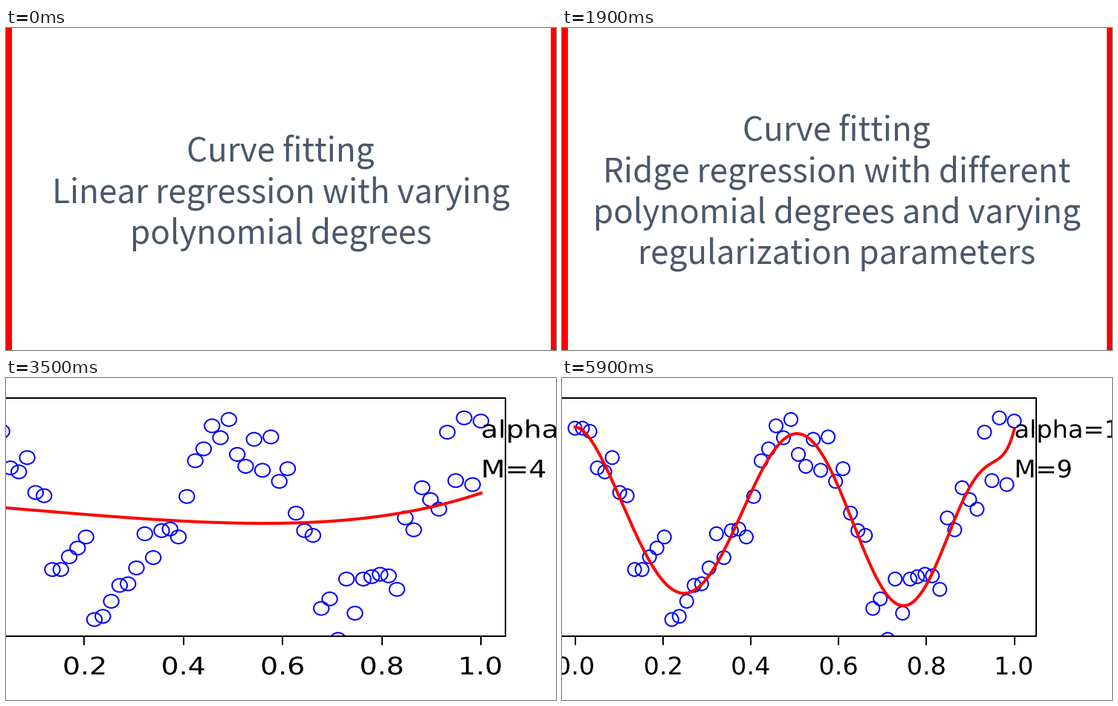
These frames come from a looping animation (740x434 px, 6200 ms). A matplotlib script:

```python
import numpy as np
import matplotlib.pyplot as plt
from matplotlib.animation import FuncAnimation
from matplotlib.collections import PatchCollection
from matplotlib.patches import Ellipse, PathPatch, Rectangle
from matplotlib.textpath import TextPath
from matplotlib.transforms import Affine2D

W, H, DPI = 740, 434, 100
STEP = 100            # ms per frame
PT = 72 / DPI         # points per pixel
SLATE = "#4a586a"
SOFT = dict(color="#2b2b2b", pen=2.7, lw=5)   # look of the enlarged charts
DEGREES = (1, 4, 6, 9)
ALPHAS = (1, 1e-4, 1e-20)

plt.rcParams["font.family"] = "DejaVu Sans"
fig = plt.figure(figsize=(W / DPI, H / DPI), dpi=DPI, facecolor="white")
ax = fig.add_axes([0, 0, 1, 1])
ax.axis("off")

# Noisy cosine samples, in hundredths
ys = np.array([
    112, 112, 108, 62, 57, 75, 31, 27, -66, -66, -50, -39, -25, -129, -125,
    -106, -86, -84, -64, -21, -51, -17, -15, -25, 26, 71, 86, 115, 100, 123,
    79, 64, 98, 59, 101, 45, 61, 5, -17, -23, -115, -103, -154, -78, -121,
    -78, -75, -72, -74, -91, -1, -16, 37, 22, 10, 107, 46, 125, 41, 121]) / 100
xs = np.linspace(0, 1, len(ys))
grid = np.linspace(0, 1, 240)


def fit(degree, alpha=0):
    """Ridge fit with a free intercept, evaluated on the grid."""
    powers = np.arange(1, degree + 1)
    X = xs[:, None] ** powers
    mean = X.mean(axis=0)
    A = np.vstack([X - mean, np.sqrt(alpha) * np.eye(degree)])
    b = np.concatenate([ys - ys.mean(), np.zeros(degree)])
    coef = np.linalg.lstsq(A, b, rcond=1e-15)[0]
    return (grid[:, None] ** powers - mean) @ coef + ys.mean()


def glyphs(s):
    return TextPath((0, 0), s.replace("-", "\u2212") if s[0] == "-" else s, size=100)


def ink(s):
    box = glyphs(s).get_extents()
    return box.x0 / 100, box.x1 / 100


class Chart:
    """Plot picture with its own horizontal and vertical scale."""

    def __init__(self, x0, u, y0, v, em, dot, xticks, yticks,
                 fmt="%.1f", yfmt="%d", color="black", pen=2.0, lw=4.0):
        self.x0, self.u, self.y0, self.v = x0, u, y0, v
        self.em, self.dot = em, dot
        self.xticks, self.yticks = xticks, yticks
        self.fmt, self.yfmt = fmt, yfmt
        self.color, self.pen, self.lw = color, pen, lw

    def px(self, x):
        return self.x0 + self.u * np.asarray(x)

    def py(self, y):
        return self.y0 - self.v * np.asarray(y)

    def text(self, s, x, y):
        ex, ey = self.em
        move = Affine2D().scale(ex / 100, -ey / 100).translate(x, y)
        patch = PathPatch(move.transform_path(glyphs(s)), fc=self.color,
                          ec=self.color, lw=(self.pen - 2) * PT, zorder=4)
        return ax.add_patch(patch)

    def line(self, xx, yy):
        return ax.plot(xx, yy, color=self.color, lw=self.pen * PT, zorder=3,
                       solid_capstyle="butt")[0]

    def ylabels(self, edge, values):
        ex, ey = self.em
        return [self.text(s, edge - (0.82 + ink(s)[1]) * ex, self.py(t) + 0.365 * ey)
                for t in values for s in [self.yfmt % t]]

    def draw(self, curve, notes):
        ex, ey = self.em
        left, right = self.px([-0.05, 1.05])
        top, bottom = self.py([1.5, -1.5])
        clip = Rectangle((left, top), right - left, bottom - top, transform=ax.transData)

        dots = PatchCollection(
            [Ellipse(p, *self.dot) for p in zip(self.px(xs), self.py(ys))],
            facecolor="none", edgecolor="#0000ff", linewidth=self.pen * PT, zorder=1)
        ax.add_collection(dots, autolim=False)
        red = ax.plot(self.px(grid), self.py(curve), color="#ff0000",
                      lw=self.lw * PT, zorder=2)[0]
        for artist in (dots, red):
            artist.set_clip_path(clip)

        parts = [dots, red,
                 self.line([left, right, right, left, left],
                           [top, top, bottom, bottom, top])]
        for t in self.xticks:
            s, x = self.fmt % t, self.px(t)
            parts.append(self.line([x, x], [bottom, bottom + 0.36 * ey]))
            parts.append(self.text(s, x - sum(ink(s)) / 2 * ex, bottom + 1.58 * ey))
        for t in self.yticks:
            y = self.py(t)
            parts.append(self.line([left - 0.35 * ex, left], [y, y]))
        parts += self.ylabels(left, self.yticks)
        parts += [self.text(s, self.px(x), self.py(y)) for s, x, y in notes]
        return parts


def title(lines, baseline):
    parts = [ax.add_patch(Rectangle((x, -2), 7.5, H + 4, fc="#ff0000", lw=0))
             for x in (0, W - 7.5)]
    for i, s in enumerate(lines):
        parts.append(ax.text(W / 2 - 0.5, baseline + 55.2 * i, s, size=44 * PT,
                             color=SLATE, ha="center", va="baseline",
                             family=["Noto Sans CJK JP", "DejaVu Sans"]))
    return parts


def linear_scene(degree):
    chart = Chart(140, 560, 192.7, 138.2, (36.8, 33.5), (17.5, 15.5),
                  np.arange(5) / 4, np.arange(-3, 4) / 2,
                  fmt="%.2f", yfmt="%.1f", **SOFT)
    parts = chart.draw(fit(degree), [(f"M={degree}", 0.695, 1.2)])
    # edge of the neighbouring plot's labels
    return parts + chart.ylabels(112 + 735, [-0.5, -1.0, -1.5])


def ridge_scene(degree, alpha):
    label = f"alpha={alpha}"
    fifths = np.arange(6) / 5
    if degree == 1:
        # the whole picture, label included, fills the stage width
        u = 700 / (1.178 + 0.058 * ink(label)[1])
        chart = Chart(20 + 0.178 * u, u, 181, 126, (0.058 * u, 38.5),
                      (0.0305 * u, 21), fifths, (-1, 0, 1), **SOFT)
    else:
        narrow = degree == 9 and alpha == ALPHAS[-1]
        x0, u = (17.5, 591) if narrow else (-28, 667)
        chart = Chart(x0, u, 187.5, 107, (0.0567 * u, 32.6),
                      (0.0305 * u, 18), fifths, ())
    return chart.draw(fit(degree, alpha), [(label, 1, 1), (f"M={degree}", 1, 0.5)])


scenes = [(700, title(["Curve fitting",
                       "Linear regression with varying",
                       "polynomial degrees"], 180))]
scenes += [(300, linear_scene(m)) for m in DEGREES]
scenes += [(700, title(["Curve fitting",
                        "Ridge regression with different",
                        "polynomial degrees and varying",
                        "regularization parameters"], 152))]
scenes += [(300, ridge_scene(m, a)) for m in DEGREES for a in ALPHAS]

ax.set_xlim(0, W)
ax.set_ylim(H, 0)
ends = np.cumsum([ms for ms, _ in scenes])


def update(frame):
    now = np.searchsorted(ends, frame * STEP, side="right")
    for i, (_, parts) in enumerate(scenes):
        for artist in parts:
            artist.set_visible(i == now)
    return []


update(0)
anim = FuncAnimation(fig, update, frames=int(ends[-1]) // STEP, interval=STEP,
                     repeat=True, repeat_delay=0, blit=False)
plt.show()
```
